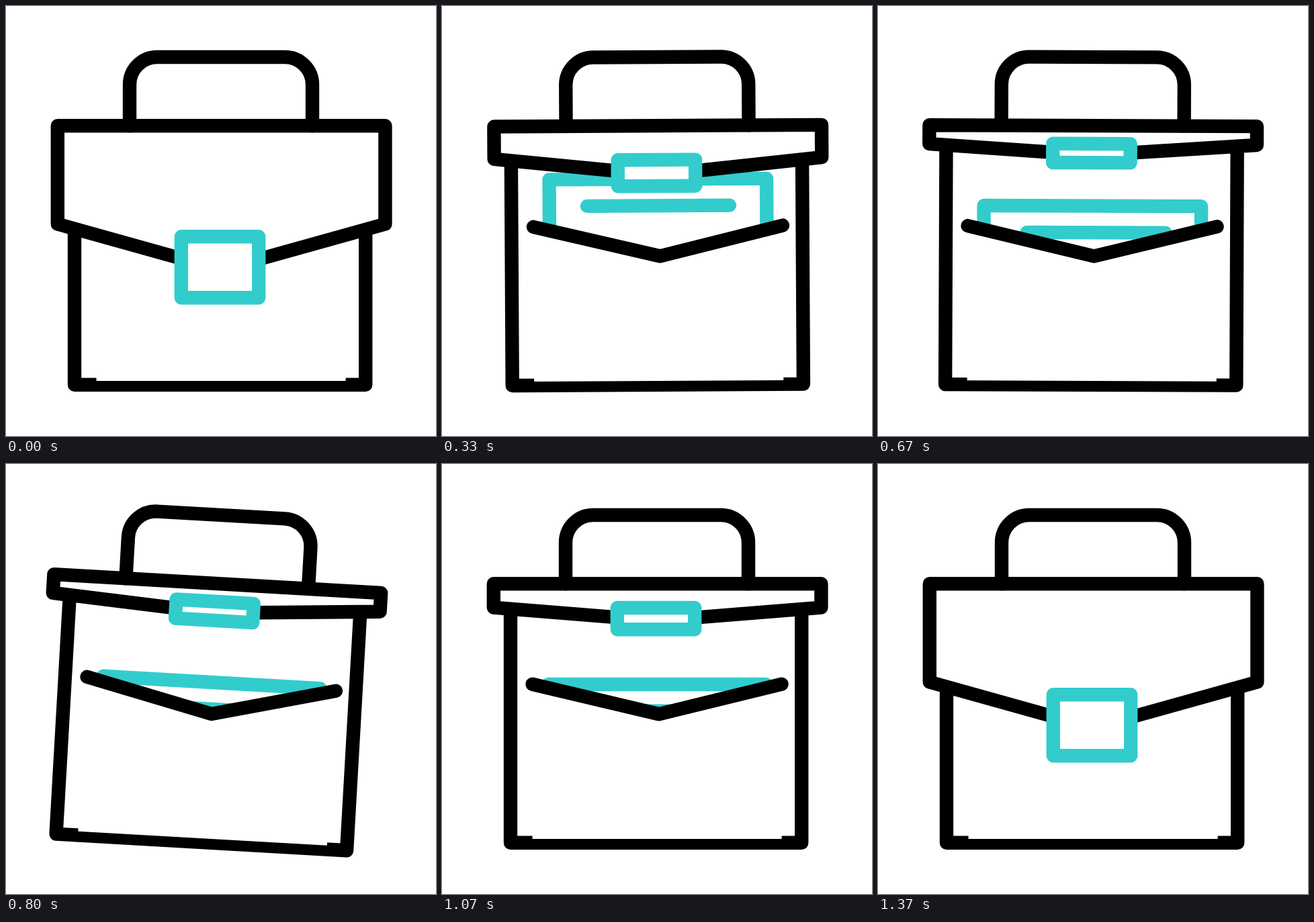
An HTML page with a canvas for the animation above (1670 ms loop, 640 px wide and 640 px high).

```html
<!DOCTYPE html>
<html lang="en">
<head>
<meta charset="utf-8">
<title>Briefcase</title>
<style>
  html, body { margin: 0; width: 100%; height: 100%; overflow: hidden; background: #fff; }
  canvas { display: block; width: 640px; height: 640px; }
</style>
</head>
<body>
<canvas id="stage" width="640" height="640"></canvas>
<script>
const ctx = document.getElementById('stage').getContext('2d');
const LOOP = 1670;
const STEP = 1000 / 30;
const BLACK = '#000';
const TEAL = '#33cccc';
const PIVOT = { x: 320, y: 76 };

// Keys are [step, value]; every stretch eases in and out.
const SWING = [[5, 0], [6.6, 1.55], [16.2, -4.95], [23, 3.85], [28.3, -2.4], [32, 0]];
const FLAP = [[5, 1], [11.8, 0], [30.4, 0], [40.7, 1]];
const PAPER = [[5, 328], [11.9, 241.5], [25.4, 328]];
const LINE_SHIFT = [[15, 0], [20, 1]];

const mix = (a, b, t) => a + (b - a) * t;

function valueAt(keys, step) {
  if (step <= keys[0][0]) return keys[0][1];
  for (let i = 1; i < keys.length; i++) {
    const [start, from] = keys[i - 1];
    const [end, to] = keys[i];
    if (step < end) {
      const t = (step - start) / (end - start);
      return mix(from, to, t * t * (3 - 2 * t));
    }
  }
  return keys[keys.length - 1][1];
}

function trace(points, closed) {
  ctx.beginPath();
  points.forEach(([x, y]) => ctx.lineTo(x, y));
  if (closed) ctx.closePath();
}

function shape(points, color, closed = false) {
  trace(points, closed);
  if (closed) {
    ctx.fillStyle = '#fff';
    ctx.fill();
  }
  ctx.strokeStyle = color;
  ctx.stroke();
}

const box = (left, top, right, bottom) =>
  [[left, top], [right, top], [right, bottom], [left, bottom]];

function drawPaper(step) {
  const top = valueAt(PAPER, step);
  const shift = valueAt(LINE_SHIFT, step);
  const lineY = top + 39.7;
  shape(box(158.5, top, 482, top + 150), TEAL, true);
  shape([[mix(214.7, 222.5, shift), lineY], [mix(426.8, 428.7, shift), lineY]], TEAL);
}

function drawPocket() {
  const rim = [[134.5, 327.8], [322.7, 372.3], [505.6, 327.6]];
  trace([...rim, [505.6, 558], [134.5, 558]], true);
  ctx.fillStyle = '#fff';
  ctx.fill();
  shape(rim, BLACK);
}

function drawFlap(step) {
  const closed = valueAt(FLAP, step);
  const side = mix(206, 324.5, closed);
  const tip = mix(222, 392.5, closed);
  shape([[76.8, 178.2], [564.4, 178.2], [564.4, side], [320.5, tip], [76.8, side]], BLACK, true);
  return closed;
}

function drawHandle() {
  ctx.beginPath();
  ctx.moveTo(184, 178.3);
  ctx.lineTo(184, 117);
  ctx.arcTo(184, 76, 225, 76, 41);
  ctx.arcTo(456, 76, 456, 117, 41);
  ctx.lineTo(456, 178.3);
  ctx.strokeStyle = BLACK;
  ctx.stroke();
}

function draw(step) {
  ctx.fillStyle = '#fff';
  ctx.fillRect(0, 0, 640, 640);
  ctx.save();
  ctx.translate(PIVOT.x, PIVOT.y);
  ctx.rotate(valueAt(SWING, step) * Math.PI / 180);
  ctx.translate(-PIVOT.x, -PIVOT.y);
  ctx.lineWidth = 20.4;
  ctx.lineCap = ctx.lineJoin = 'round';

  shape([[102, 200], [102, 563.8], [535.2, 563.8], [535.2, 200]], BLACK);
  drawPaper(step);
  drawPocket();
  const closed = drawFlap(step);
  drawHandle();
  shape(box(260.8, mix(205, 343.2, closed), 376.2, mix(233.2, 434.2, closed)), TEAL, true);
  ctx.restore();
}

function tick() {
  const time = performance.now() % LOOP;
  draw(Math.floor((time + 5) / STEP));
  requestAnimationFrame(tick);
}
tick();
</script>
</body>
</html>
```
